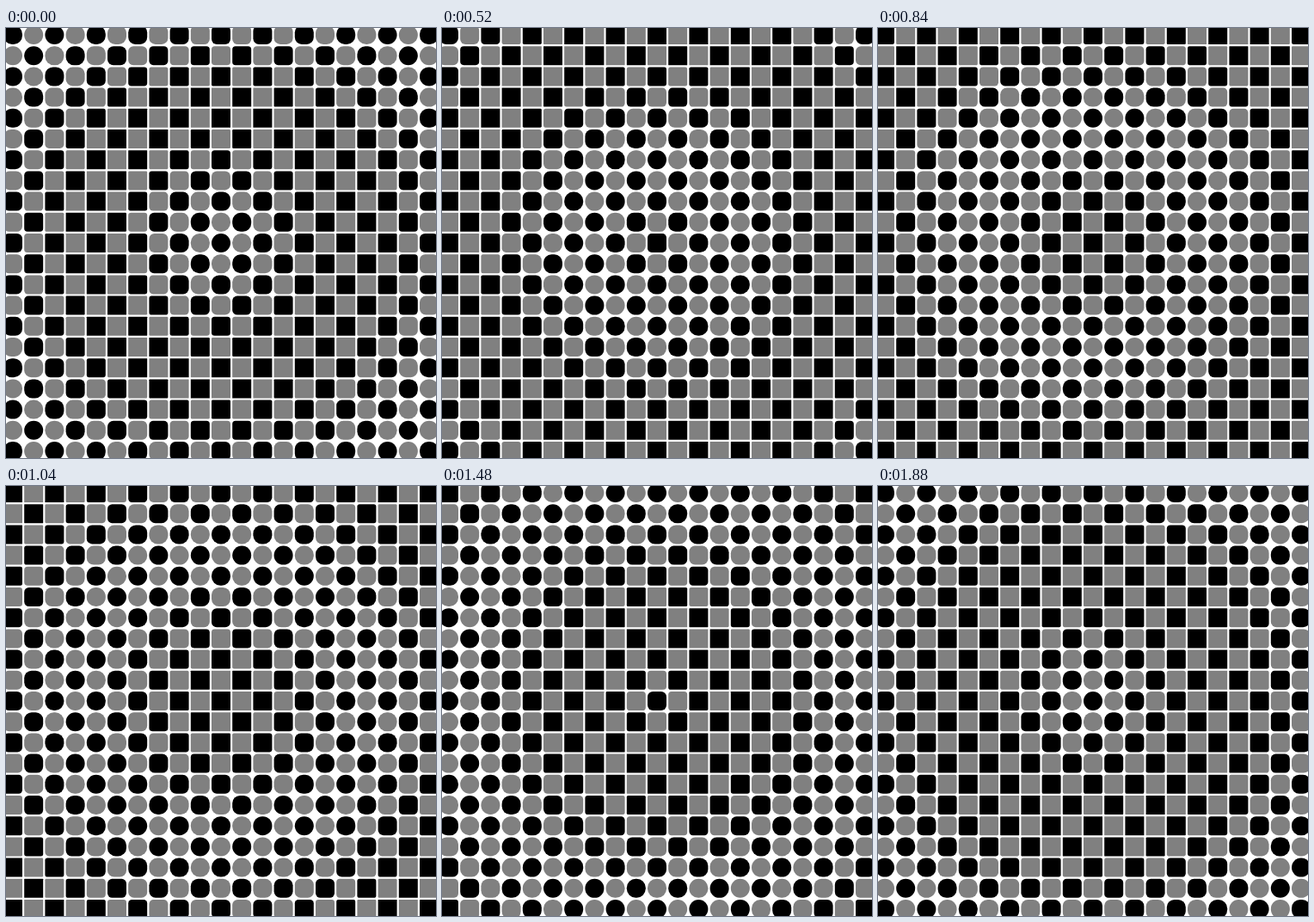
An HTML page with a canvas for the animation above (1.92 s loop, 500 by 500 pixels).

```html
<!DOCTYPE html>
<html lang="en">
<head>
<meta charset="utf-8">
<title>Circle and square ripple</title>
<style>
  html, body { margin: 0; width: 100%; height: 100%; overflow: hidden; background: #fff; }
  canvas { display: block; width: 500px; height: 500px; }
</style>
</head>
<body>
<canvas id="stage" width="500" height="500"></canvas>
<script>
const ctx = document.getElementById('stage').getContext('2d');
const STAGE = 500, CENTER = STAGE / 2;
const PITCH = 24.2, SIZE = 22, REACH = 10;
const LOOP = 1920, STEP = 40;
const WAVE = 0.02; // radians per pixel from the centre

function drawTile(col, row, phase) {
  const dx = col * PITCH, dy = row * PITCH;
  const roundness = (1 + Math.cos(phase - WAVE * Math.hypot(dx, dy))) / 2;
  ctx.fillStyle = (col + row) % 2 ? '#808080' : '#000';
  ctx.beginPath();
  ctx.roundRect(CENTER + dx - SIZE / 2, CENTER + dy - SIZE / 2, SIZE, SIZE, roundness * SIZE / 2);
  ctx.fill();
}

function draw(time) {
  const phase = 2 * Math.PI * time / LOOP;
  ctx.fillStyle = '#fff';
  ctx.fillRect(0, 0, STAGE, STAGE);
  for (let row = -REACH; row <= REACH; row++)
    for (let col = -REACH; col <= REACH; col++) drawTile(col, row, phase);
}

const start = performance.now();
function tick() {
  const elapsed = (performance.now() - start) % LOOP;
  draw(Math.floor(elapsed / STEP) * STEP);
  requestAnimationFrame(tick);
}
tick();
</script>
</body>
</html>
```
